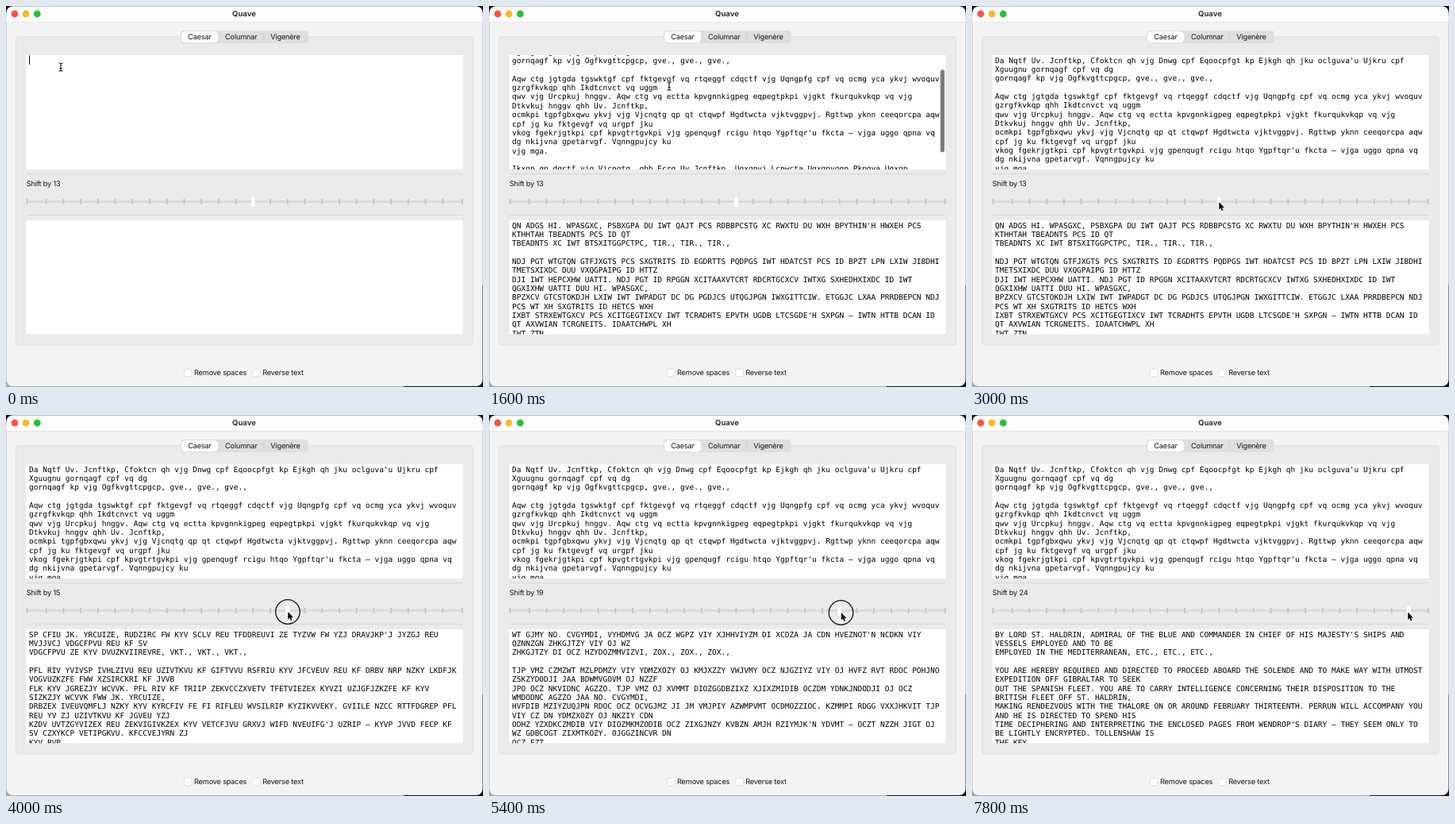
Animation of 601x480 px, one loop 8000 ms. Source, as an HTML page:

```html
<!DOCTYPE html>
<html lang="en">
<head>
<meta charset="utf-8">
<title>Quave</title>
<style>
  html, body { margin: 0; width: 100%; height: 100%; overflow: hidden; background: #f3f3f3; }
  svg { display: block; width: 601px; height: 480px; }
  text { font: 9.2px Inter, sans-serif; letter-spacing: -.02em; fill: #161616; text-rendering: geometricPrecision; }
  .title { font-weight: 700; font-size: 9.5px; letter-spacing: 0; fill: #333; }
  .mid { text-anchor: middle; }
  .mono text { font: 9.52px "DejaVu Sans Mono", monospace; letter-spacing: 0; fill: #000; white-space: pre; }
  .raised { filter: drop-shadow(0 .5px .7px rgba(0, 0, 0, .32)); }
  .cursor { stroke: #fff; paint-order: stroke; }
</style>
</head>
<body>
<svg viewBox="0 0 601 480">
  <defs>
    <clipPath id="inputClip"><rect x="25.5" y="62" width="550" height="144"/></clipPath>
    <clipPath id="outputClip"><rect x="25.5" y="270" width="550" height="143.5"/></clipPath>
  </defs>

  <!-- Desktop and window -->
  <rect width="601" height="480" fill="#a9a9a9"/>
  <path d="M501 480V470H600V352H601V480ZM0 0H601V12H590V6H10V12H0Z" fill="#111"/>
  <rect x=".5" y=".5" width="600" height="478.5" rx="8" fill="#f3f3f3"/>
  <path d="M.5 20V8.500a8 8 0 0 1 8-8H592.500a8 8 0 0 1 8 8V20Z" fill="#fdfdfd"/>
  <path d="M.5 20.500H600.500" stroke="#e6e6e6"/>
  <circle cx="11" cy="10" r="4.400" fill="#ff5148"/>
  <circle cx="25" cy="10" r="4.400" fill="#fdb924"/>
  <circle cx="39.300" cy="10" r="4.400" fill="#27c235"/>
  <text class="title mid" x="300" y="13.300">Quave</text>

  <!-- Tabs -->
  <rect x="12.500" y="38.500" width="576" height="388.500" rx="4" fill="#eaeaea" stroke="#e2e2e2"/>
  <rect x="220" y="31" width="161" height="16" rx="4.500" fill="#dedede"/>
  <path d="M324.500 34.500V43.500" stroke="#cfcfcf"/>
  <rect class="raised" x="221" y="32" width="46" height="14" rx="3.800" fill="#fff"/>
  <text class="mid" x="244" y="42.300">Caesar</text>
  <text class="mid" x="296.300" y="42.300">Columnar</text>
  <text class="mid" x="352" y="42.300">Vigenère</text>

  <!-- Input -->
  <rect x="25.500" y="62" width="550" height="144" fill="#fff"/>
  <g clip-path="url(#inputClip)">
    <g id="input" class="mono">
      <rect id="caret" x="29" width="1" height="11.400"/>
    </g>
    <rect id="scrollbar" x="568.700" width="5.200" rx="2.600" fill="#7a7a7a"/>
  </g>

  <!-- Slider -->
  <path d="M26 211.500H575M26 263.500H575" stroke="#d8d8d8"/>
  <text id="label" x="25.700" y="226.500"></text>
  <rect x="26" y="245" width="549.500" height="3" rx="1.500" fill="#d9d9d9"/>
  <path id="ticks" stroke="#c4c4c4" stroke-width="1.800"/>
  <rect id="knob" class="raised" y="240" width="6" height="13.700" rx="2.600" fill="#fff"/>

  <!-- Output -->
  <rect x="25.500" y="270" width="550" height="143.500" fill="#fff"/>
  <g clip-path="url(#outputClip)"><g id="output" class="mono"></g></g>

  <!-- Options -->
  <g fill="#fff" stroke="#d9d9d9" stroke-width=".8">
    <rect x="224.500" y="457.300" width="9.500" height="9.500" rx="2.200"/>
    <rect x="310.800" y="457.300" width="9.500" height="9.500" rx="2.200"/>
  </g>
  <text x="237" y="465.200">Remove spaces</text>
  <text x="323.200" y="465.200">Reverse text</text>

  <!-- Pointer -->
  <g id="pointer">
    <circle id="ring" r="15.300" fill="none" stroke="#111" stroke-width="1.300"/>
    <path id="arrow" class="cursor" stroke-width="1.400" d="M.3 0V9.600L2.500 7.600L3.900 10.900L5.500 10.200L4.100 7H7Z"/>
    <g id="beam" fill="none">
      <path d="M-2.500-5Q0-5 0-3.500Q0-5 2.500-5M0-3.500V3.500M-2.500 5Q0 5 0 3.500Q0 5 2.500 5M-1.500 1.500H1.500" stroke="#fff" stroke-width="2.200" stroke-opacity=".7"/>
      <path d="M-2.500-5Q0-5 0-3.500Q0-5 2.500-5M0-3.500V3.500M-2.500 5Q0 5 0 3.500Q0 5 2.500 5M-1.500 1.500H1.500" stroke="#111" stroke-width="1.100"/>
    </g>
  </g>
</svg>
<script>
const LOOP = 8000, STEP = 200, LINE = 11.36, PASTE = 400, PRESS = 3200, RELEASE = 7800;
const MAX_SCROLL = 49.4, TICK = 21.72;

const letter = `By Lord St. Haldrin, Admiral of the Blue and Commander in Chief of his majesty's Ships and
Vessels employed and to be
employed in the Mediterranean, etc., etc., etc.,

You are hereby required and directed to proceed aboard the Solende and to make way with utmost
expedition off Gibraltar to seek
out the Spanish fleet. You are to carry intelligence concerning their disposition to the
British fleet off St. Haldrin,
making rendezvous with the Thalore on or around February thirteenth. Perrun will accompany you
and he is directed to spend his
time deciphering and interpreting the enclosed pages from Wendrop's diary – they seem only to
be lightly encrypted. Tollenshaw is
the key.

Given on board the Thalore, off Cape St Haldrin, Seventh January Seventeen Ninety Seven
To Commodore Ambrice Fawlen, Esqr
By Command of the Admiral Sir Hugh Dolvin`;

const pointerPath = [
  [0, 69, 77], [1200, 69, 77], [1600, 227, 101], [2400, 227, 101],
  [3000, 311, 247], [3400, 311, 247], [4000, 355, 248], [4800, 443.5, 249],
  [5400, 443.5, 249], [6600, 514, 246], [7200, 549, 248.5]
];
const scrollPath = [[0, 0], [399, 0], [PASTE, MAX_SCROLL], [1400, MAX_SCROLL], [1800, -5], [2000, -3], [2200, 0]];

const $ = id => document.getElementById(id);
const set = (id, attrs) => {
  for (const name in attrs) $(id).setAttribute(name, attrs[name]);
};
const show = (id, on) => set(id, { visibility: on ? 'visible' : 'hidden' });

function caesar(text, shift) {
  return text.replace(/[a-z]/gi, ch => {
    const base = ch < 'a' ? 65 : 97;
    return String.fromCharCode((ch.charCodeAt(0) - base + shift) % 26 + base);
  });
}

function along(path, t) {
  const i = path.findIndex(key => key[0] > t);
  if (i < 0) return path[path.length - 1].slice(1);
  const [from, to] = [path[i - 1], path[i]];
  const part = (t - from[0]) / (to[0] - from[0]);
  return from.slice(1).map((v, k) => v + (to[k + 1] - v) * part);
}

function addLines(id, count, baseline) {
  return Array.from({ length: count }, (_, i) => {
    const line = document.createElementNS('http://www.w3.org/2000/svg', 'text');
    line.setAttribute('x', 29);
    line.setAttribute('y', baseline + i * LINE);
    return $(id).appendChild(line);
  });
}

function fill(lines, text) {
  const parts = text.split('\n');
  lines.forEach((line, i) => { line.textContent = parts[i] || ''; });
}

const tickX = i => 300.5 + (i - 12.5) * TICK;
const rows = letter.split('\n');
const inputLines = addLines('input', rows.length, 71.5);
const outputLines = addLines('output', 13, 279.5);
const lastLine = inputLines[rows.length - 1];

set('ticks', {
  d: Array.from({ length: 26 }, (_, i) => {
    const x = i === 0 ? 26.5 : i === 25 ? 574.8 : tickX(i);
    return `M${x} 243V250`;
  }).join('')
});

function draw(t) {
  const [x, y] = along(pointerPath, t);
  const [scroll] = along(scrollPath, t);
  const pasted = t >= PASTE;
  const shift = t < PRESS ? 13 : Math.round((x - 300.5) / TICK + 12.5);
  const overText = y < 206;

  fill(inputLines, pasted ? caesar(letter, 2) : '');
  fill(outputLines, pasted ? caesar(letter.toUpperCase(), 2 + shift) : '');
  set('input', { transform: `translate(0 ${-scroll})` });
  set('caret', {
    x: pasted ? 29 + lastLine.getComputedTextLength() : 29,
    y: 62.3 + (pasted ? (rows.length - 1) * LINE : 0)
  });

  show('scrollbar', pasted && t < 2600);
  set('scrollbar', {
    y: 64 + 36 * Math.max(0, scroll) / MAX_SCROLL,
    height: 104 + Math.min(0, scroll),
    opacity: t < 2400 ? 1 : .5
  });

  $('label').textContent = `Shift by ${shift}`;
  set('knob', { x: tickX(shift) - 3 });
  set('pointer', { transform: `translate(${x} ${y})` });
  show('beam', overText);
  show('arrow', !overText);
  show('ring', t >= PRESS && t < RELEASE);
}

const start = performance.now();
let drawn = -1;
function tick() {
  const elapsed = (performance.now() - start) % LOOP;
  const t = Math.floor(elapsed / STEP) * STEP;
  if (t !== drawn) draw(drawn = t);
  requestAnimationFrame(tick);
}
tick();
</script>
</body>
</html>
```
